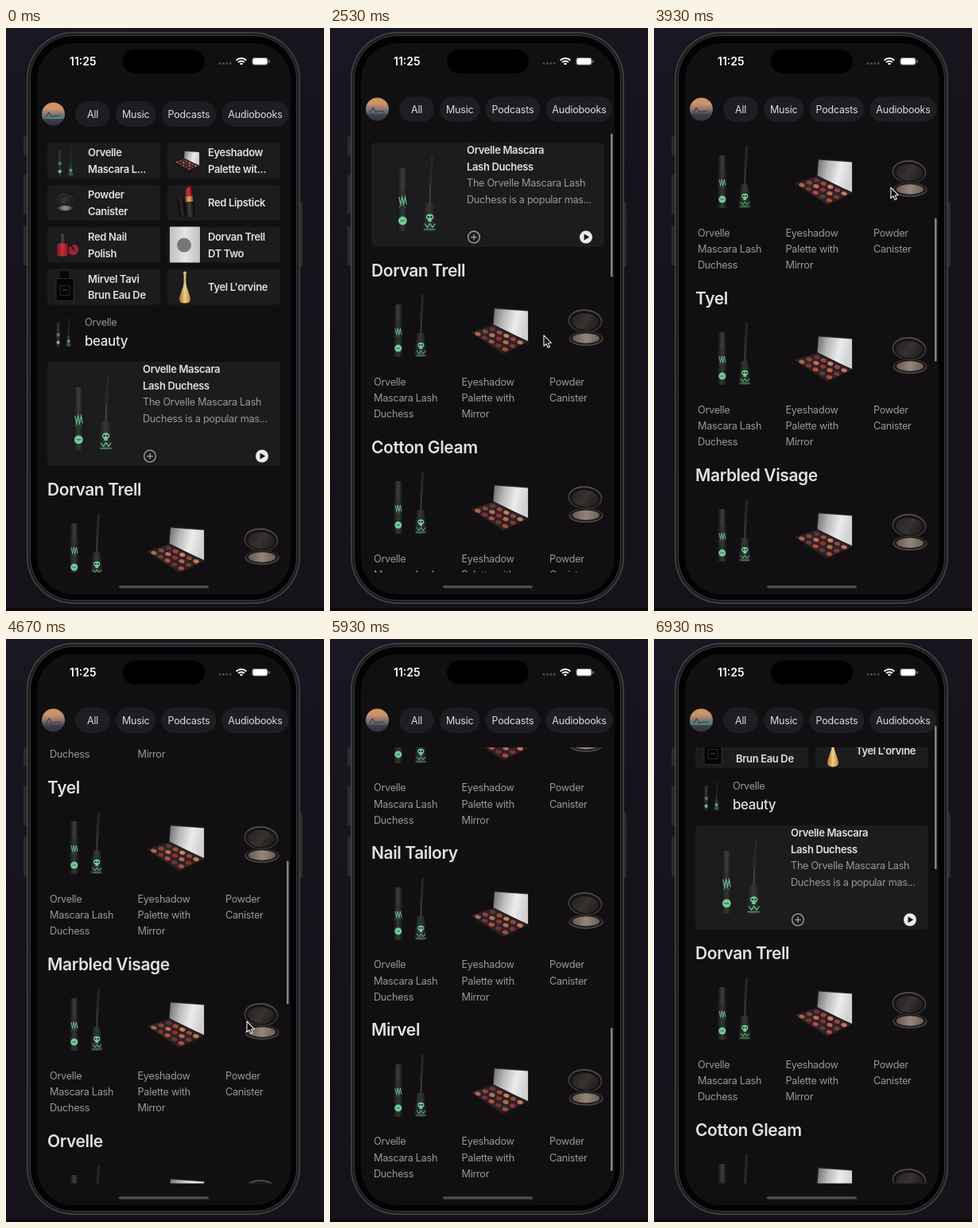
These frames come from a looping animation (400x732 px, 7000 ms). An HTML page with a canvas:

```html
<!DOCTYPE html>
<html lang="en">
<head>
<meta charset="utf-8">
<title>Shop feed</title>
<style>
html, body { margin: 0; width: 100%; height: 100%; overflow: hidden; background: #16131b; }
canvas { display: block; width: 400px; height: 732px; }
</style>
</head>
<body>
<canvas id="stage"></canvas>
<script>
const W = 400, H = 732, LOOP = 7000, STEP = 200 / 3;
const canvas = document.getElementById('stage');
const ctx = canvas.getContext('2d');
const dpr = window.devicePixelRatio || 1;
canvas.width = W * dpr;
canvas.height = H * dpr;

const CARD = '#1c1b1e', LIGHT = '#dfe2de', GREY = '#98979b', MINT = '#74c999', BLACK = '#060506';

// Each flick adds its distance, slowing down by the given power
const flicks = [
  { start: 28, span: 17, distance: 331, power: 2 },
  { start: 50, span: 20, distance: 506, power: 2 },
  { start: 71, span: 10, distance: 634, power: 2 },
  { start: 82, span: 9, distance: 180, power: 2 },
  { start: 95.035, span: 8.965, distance: -1466, power: 1 }
];
// Pointer stops: step, x, y
const stops = [[15, 366, 734], [22, 249, 597], [28, 249, 597], [34, 270, 350], [46, 266, 488],
  [51, 266, 488], [60, 299, 190], [70, 303, 480], [75, 304, 250], [80, 305, 490], [88, 300, 250]];

const clamp = v => Math.min(1, Math.max(0, v));
const scrollAt = step => flicks.reduce((sum, f) =>
  sum + f.distance * (1 - (1 - clamp((step - f.start) / f.span)) ** f.power), 0);

function pointerAt(step) {
  const i = stops.findIndex(s => s[0] >= step);
  if (i < 1) return null;
  const [t0, x0, y0] = stops[i - 1], [t1, x1, y1] = stops[i];
  const u = (step - t0) / (t1 - t0), v = u * u * (3 - 2 * u);
  return [x0 + (x1 - x0) * v, y0 + (y1 - y0) * v];
}

function box(x, y, w, h, r, fill) {
  ctx.beginPath();
  ctx.roundRect(x, y, w, h, r);
  ctx.fillStyle = fill;
  ctx.fill();
}
function oval(x, y, rx, ry, fill, turn = 0) {
  ctx.beginPath();
  ctx.ellipse(x, y, rx, ry, turn, 0, 7);
  ctx.fillStyle = fill;
  ctx.fill();
}
function poly(points, fill) {
  ctx.beginPath();
  points.forEach(p => ctx.lineTo(...p));
  ctx.closePath();
  ctx.fillStyle = fill;
  ctx.fill();
}
function line(points, color, width) {
  ctx.beginPath();
  points.forEach(p => ctx.lineTo(...p));
  ctx.strokeStyle = color;
  ctx.lineWidth = width;
  ctx.stroke();
}
function zigzag(x, y, w, h, count, color) {
  line(Array.from({ length: count + 1 }, (_, i) => [x + w * i / count, y + (i % 2) * h]), color, 0.9);
}
function grad(x0, y0, x1, y1, ...colors) {
  const g = ctx.createLinearGradient(x0, y0, x1, y1);
  colors.forEach((c, i) => g.addColorStop(i / (colors.length - 1), c));
  return g;
}
// Box shaded like a cylinder
function tube(x, y, w, h, r, edge, shine) {
  box(x, y, w, h, r, grad(x, 0, x + w, 0, edge, shine, edge));
}
function setFont(size, weight, spacing) {
  ctx.font = `${weight} ${size}px Inter, sans-serif`;
  ctx.letterSpacing = spacing + 'px';
}
function text(str, x, yMid, size, weight, color, spacing = -0.3) {
  setFont(size, weight, spacing);
  ctx.fillStyle = color;
  ctx.fillText(str, x, yMid + size * 0.36);
}
const bold = (str, x, y) => text(str, x, y, 13, 600, LIGHT, -0.35);
const label = (str, x, y) => text(str, x, y, 12.7, 400, GREY);

function place(draw, x, y, scale = 1, turn = 0) {
  ctx.save();
  ctx.translate(x, y);
  ctx.scale(scale, scale);
  ctx.rotate(turn);
  draw();
  ctx.restore();
}

function mascara() {
  tube(3, 12, 9.5, 24, 2, '#161717', '#3d403f');
  tube(2, 33, 11.5, 45, 2, '#131514', '#333735');
  zigzag(4, 42, 8, 8, 5, MINT);
  zigzag(4, 53, 7, -3, 2, '#3d6c53');
  oval(7.8, 67, 4.5, 4.5, MINT);
  line([[5.5, 67], [10, 67]], '#2f6549', 1);
  poly([[37.5, 0], [40, 0], [38.5, 31], [35, 31]], '#2f3031');
  for (let y = 2; y < 31; y += 2.4) line([[36, y], [40, y - 1]], '#171818', 0.8);
  line([[36.8, 31], [36.3, 49]], '#3d4041', 1.8);
  poly([[32, 48], [40, 48], [44.5, 78], [28, 78]], grad(28, 0, 44, 0, '#191b1a', '#343835', '#151616'));
  oval(36.3, 63, 4, 3.2, MINT);
  for (const x of [34.7, 37.9]) oval(x, 63, 1.1, 1.1, '#182019');
  box(34.5, 65, 3.6, 3, 0.6, MINT);
  zigzag(31, 70, 11, 4, 4, MINT);
  line([[30, 76], [42.5, 76]], '#4c9a70', 1);
}

function palette() {
  poly([[30, 0], [74, 3], [74, 45], [28, 26]], '#242122');
  poly([[31, 1.5], [73, 4.5], [73, 42], [29.5, 24]], grad(30, 0, 74, 10, '#6d6c70', '#b9b9bc', '#ececee', '#cfcfd1'));
  poly([[0, 31], [29, 21], [74, 43], [74, 47], [42, 63], [0, 36]], '#131011');
  poly([[1, 31], [29, 22], [73, 43], [42, 58]], '#2c2324');
  for (let i = 0; i < 15; i++) {
    const u = (i % 5 + 0.5) / 5, v = (Math.floor(i / 5) + 0.5) / 3;
    const tone = i * 7 % 15;
    oval(29 + 43 * u - 28 * v, 23.5 + 20 * u + 8.5 * v + 5 * u * v, 3.7, 2.4,
      `hsl(${350 + tone * 2}, ${32 + tone * 5 % 24}%, ${30 + tone * 2}%)`, 0.25);
  }
}

function compact() {
  oval(21, 12.5, 21.3, 14.5, '#4b494b', 0.08);
  oval(21, 13, 20, 13, '#141213', 0.08);
  oval(21, 13.5, 17, 10.5, grad(5, 4, 36, 24, '#25211f', '#383230', '#1d1a19'), 0.08);
  box(12, 24, 18, 6, 2, '#1e1c1d');
  oval(22, 38, 21.5, 9.5, '#111011');
  oval(22, 35, 21.5, 9, '#4a484a');
  oval(22, 34.5, 20.3, 8, '#1e1a1a');
  oval(22, 34.5, 17, 6.2, grad(5, 0, 39, 0, '#66594f', '#95867b', '#6b5e55'));
}

function lipstick() {
  place(() => tube(0, 0, 9, 22, 1, '#070607', '#2b2729'), 12, 18, 1, -0.13);
  place(() => {
    tube(1, 0, 8, 15, [6, 2, 0, 0], '#8b141c', '#cc3036');
    tube(0.5, 12, 9.5, 7, 0, '#82531f', '#dcae68');
    tube(-1, 19, 12, 19, 1, BLACK, '#433b3d');
  }, 21, 3, 1, -0.07);
}

function polish() {
  tube(15, 9, 8, 14, 2, '#0a0909', '#4f4949');
  tube(12, 21, 14, 16, 3, '#791520', '#c8323e');
  oval(33, 29, 6, 7, '#9c2430', 0.5);
  line([[27, 17], [33, 29]], '#1b1718', 2);
}

function whiteBox() {
  tube(3, 0, 38, 45, 1, '#c0c0c2', '#e5e5e6');
  oval(21, 23, 9, 9, '#77777a');
}

function darkBottle() {
  box(16, 3, 11, 9, 1, BLACK);
  box(11, 12, 22, 28, 2, BLACK);
  ctx.strokeStyle = '#3b393c';
  ctx.lineWidth = 0.7;
  ctx.strokeRect(11, 12, 22, 28);
  ctx.strokeRect(16, 21, 12, 12);
  line([[19, 26.5], [25, 26.5]], '#77736a', 0.7);
}

function amberBottle() {
  box(20, 3, 4, 4, 2, '#d9bc7f');
  tube(20.3, 6, 3.4, 15, 1, '#8b6931', '#f2dc9c');
  ctx.beginPath();
  ctx.moveTo(21, 17);
  ctx.bezierCurveTo(19, 30, 8, 43, 22, 43);
  ctx.bezierCurveTo(36, 43, 25, 30, 23, 17);
  ctx.fillStyle = grad(15, 0, 29, 0, '#a86a2b', '#f0cf87', '#bd8138');
  ctx.fill();
}

const cards = [
  [['Orvelle', 'Mascara L...'], () => place(mascara, 12, 4, 0.48)],
  [['Eyeshadow', 'Palette wit...'], () => place(palette, 8, 10, 0.44)],
  [['Powder', 'Canister'], () => place(compact, 12, 13, 0.47)],
  [['Red Lipstick'], lipstick],
  [['Red Nail', 'Polish'], polish],
  [['Dorvan Trell', 'DT Two'], whiteBox],
  [['Mirvel Tavi', 'Brun Eau De'], darkBottle],
  [["Tyel L'orvine"], amberBottle]
];
const sections = ['Dorvan Trell', 'Cotton Gleam', 'Tyel', 'Marbled Visage',
  'Orvelle', 'Trel Cosmetics', 'Nail Tailory', 'Mirvel'];
const products = [
  { lines: ['Orvelle', 'Mascara Lash', 'Duchess'], art: mascara, dx: 23, dy: 31 },
  { lines: ['Eyeshadow', 'Palette with', 'Mirror'], art: palette, dx: 10.5, dy: 47 },
  { lines: ['Powder', 'Canister'], art: compact, dx: 24, dy: 51 }
];

function drawCard([lines, art], i) {
  const x = 52 + (i % 2) * 151, y = 144 + Math.floor(i / 2) * 52.8;
  box(x, y, 142, 45, 4, CARD);
  place(art, x, y);
  lines.forEach((s, k) => bold(s, x + 51, y + 23 + (k - (lines.length - 1) / 2) * 20.5));
}

function drawFeature() {
  place(mascara, 62, 364, 0.46);
  label('Orvelle', 99, 369);
  text('beauty', 99, 393, 17, 500, LIGHT, -0.4);
  box(52, 419, 293, 131, 5, CARD);
  place(mascara, 82, 436.5, 1.2);
  bold('Orvelle Mascara', 172, 428.5);
  bold('Lash Duchess', 172, 449);
  label('The Orvelle Mascara Lash', 172, 469.5);
  label('Duchess is a popular mas...', 172, 490);
  oval(181, 537.5, 8, 8, '#a5a5a7');
  oval(181, 537.5, 6.7, 6.7, CARD);
  box(177.3, 536.9, 7.4, 1.3, 0, '#a5a5a7');
  box(180.4, 533.8, 1.3, 7.4, 0, '#a5a5a7');
  oval(322, 537.5, 8, 8, '#e6ebe3');
  poly([[319.6, 533.5], [326.2, 537.5], [319.6, 541.5]], '#151416');
}

function drawSection(name, i) {
  const y = 579 + i * 222;
  text(name, 52, y, 21, 600, LIGHT, -0.4);
  products.forEach(({ lines, art, dx, dy }, col) => {
    const x = 55 + col * 110.5;
    place(art, x + dx, y + dy);
    lines.forEach((s, k) => label(s, x, y + 140 + k * 20.4));
  });
}

function drawPhone() {
  ctx.fillStyle = grad(0, 0, 400, 732, '#191721', '#15121b', '#16131b');
  ctx.fillRect(0, 0, W, H);
  box(0, 728, W, 4, 0, '#0f090d');
  for (const [x, y, h] of [[22, 136, 24], [22, 184, 50], [22, 248, 50], [367, 218, 82]]) box(x, y, 6, h, 1.5, '#2b2a2d');
  // Nested rims: inset and colour
  [[0, '#454447'], [1.5, '#1c1b1d'], [4, '#39383a'], [5, '#030303']]
    .forEach(([d, color]) => box(26 + d, 5 + d, 344 - 2 * d, 718 - 2 * d, 59 - d, color));
  box(39, 19, 319, 692, 46, '#110f12');
}

function drawStatus() {
  box(147, 27, 103, 30, 15, '#000');
  text('11:25', 80, 42, 14, 600, '#fff', 0);
  for (let i = 0; i < 4; i++) oval(269 + i * 4.4, 44.5, 1.4, 1.4, '#4c4b4f');
  ctx.strokeStyle = '#fff';
  ctx.lineWidth = 2;
  for (const r of [2, 5.6, 9]) {
    ctx.beginPath();
    ctx.arc(296, 47, r, -Math.PI * 0.75, -Math.PI * 0.25);
    ctx.stroke();
  }
  box(309.5, 37, 20, 9.8, 3.3, '#6f6e72');
  box(310.5, 38, 18, 7.8, 2.4, '#fff');
  box(330.3, 40.3, 1.4, 3.4, 0.7, '#8c8b8f');
}

function drawAvatar(y, step) {
  ctx.save();
  ctx.beginPath();
  ctx.arc(59.5, y, 14.5, 0, 7);
  ctx.clip();
  ctx.fillStyle = grad(0, y - 14, 0, y + 14, '#d2935a', '#c9966c', '#8d7470', '#403d4a', '#33323f');
  ctx.fillRect(44, y - 15, 31, 30);
  // Teal water shows at both ends of the loop
  ctx.globalAlpha = clamp(Math.abs(step - 64) / 14 - 1.5);
  box(44, y + 1, 31, 5, 0, '#4d827b');
  ctx.globalAlpha = 1;
  line([[50, y + 4], [54 + Math.sin(step * 0.4), y - 2], [57, y + 3], [68, y + 2]], '#463c40', 1.2);
  ctx.restore();
}

function drawHeader(y, step) {
  drawAvatar(y, step);
  let x = 87;
  for (const name of ['All', 'Music', 'Podcasts', 'Audiobooks']) {
    setFont(12.5, 400, -0.2);
    const inner = ctx.measureText(name).width, w = Math.max(44, inner + 16);
    box(x, y - 16, w, 32, 16, '#1e1d21');
    text(name, x + (w - inner) / 2, y, 12.5, 400, '#dcdcdc', -0.2);
    x += w + 7;
  }
}

function drawPointer() {
  ctx.lineJoin = 'round';
  poly([[0, 0], [0, 13.5], [3, 10.8], [5.2, 15.5], [7.4, 14.5], [5.3, 10], [9.3, 9.7]], '#08080a');
  ctx.strokeStyle = '#eee';
  ctx.lineWidth = 1.1;
  ctx.stroke();
}

function render(time) {
  const step = Math.floor((time % LOOP + 3.4) / STEP);
  const scroll = scrollAt(step);
  ctx.setTransform(dpr, 0, 0, dpr, 0, 0);
  drawPhone();

  ctx.save();
  ctx.beginPath();
  ctx.rect(39, 136, 319, 547.5);
  ctx.clip();
  ctx.translate(0, -scroll);
  cards.forEach(drawCard);
  drawFeature();
  sections.forEach(drawSection);
  ctx.restore();

  drawStatus();
  drawHeader(108 - Math.min(scroll, 6), step);
  if (scroll > 0) box(353, 61 + scroll * 0.26, 2.6, 180, 1.3, '#838285');
  box(142, 700, 113, 3.6, 1.8, '#4c4b4e');
  const pointer = pointerAt(step);
  if (pointer) place(drawPointer, ...pointer);
}

const start = performance.now();
function tick() {
  render(performance.now() - start);
  requestAnimationFrame(tick);
}
tick();
</script>
</body>
</html>
```
